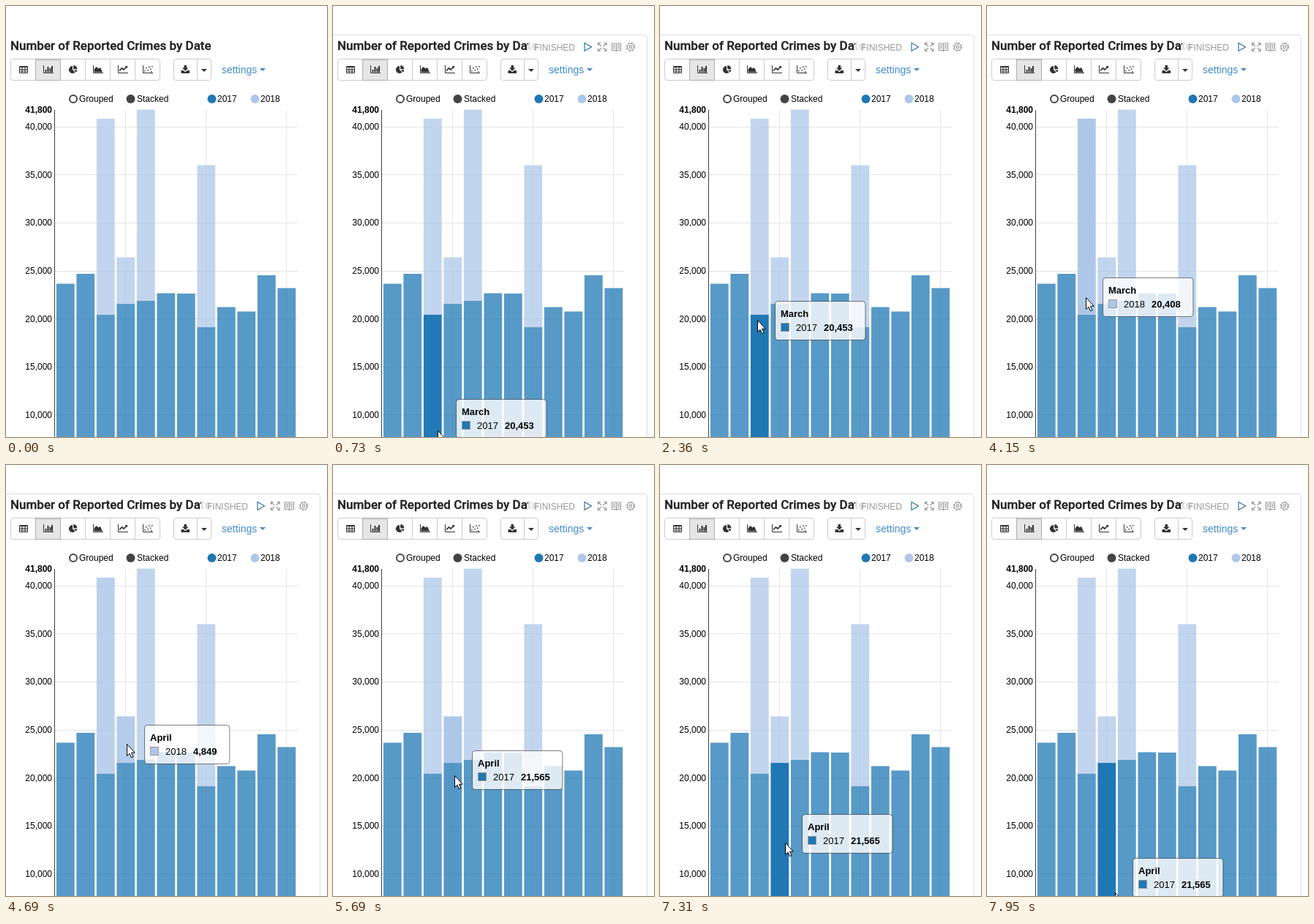
An HTML page for the animation above (8000 ms loop, 439x589 px).

```html
<!DOCTYPE html>
<html lang="en">
<head>
<meta charset="utf-8">
<title>Reported crimes chart</title>
<style>
  html, body { margin: 0; width: 100%; height: 100%; overflow: hidden; background: #fff; }
  svg { display: block; font: 12px "Liberation Sans", Arial, sans-serif; }
  .title { font: 500 17px Roboto, sans-serif; fill: #212121; stroke: #212121; stroke-width: .35; }
  .grid { stroke: #e5e5e5; }
  .icon { fill: #333; }
  .line { fill: none; stroke: #333; }
  .link { fill: #428bca; }
  .tool { fill: none; stroke: #999; stroke-width: 1.2; }
  .tip { font-size: 13px; }
  .bold { font-weight: bold; }
</style>
</head>
<body>
<svg id="stage" width="439" height="589" viewBox="0 0 439 589">
  <text class="title" x="6" y="60">Number of Reported Crimes by Date</text>

  <g id="panel">
    <path d="M0 39.5H426Q429.5 39.5 429.5 43V589" fill="none" stroke="#ddd"/>
    <rect x="267" y="46" width="150" height="20" fill="#fff" opacity=".85"/>
    <text x="275" y="61" fill="#999">FINISHED</text>
    <path class="tool" d="M344 50.5V61.5L353.500 56Z" style="stroke:#3071a9"/>
    <path class="tool" d="M362.500 54V50.500H366M370.500 50.500H374V54M374 58V61.500H370.500M366 61.500H362.500V58M363 51L367 55M373.500 51L369.500 55M363 61L367 57M373.500 61L369.500 57"/>
    <path class="tool" d="M381.500 51H386Q387.500 51 387.500 52.500Q387.500 51 389 51H393.500V60.500H389L387.500 61.500L386 60.500H381.500ZM387.500 52V61M383 53.500H386M383 55.500H386M383 57.500H386M389 53.500H392M389 55.500H392M389 57.500H392"/>
    <circle class="tool" cx="407" cy="56" r="4.500"/>
    <circle class="tool" cx="407" cy="56" r="1.800"/>
    <circle class="tool" cx="407" cy="56" r="5.600" stroke-dasharray="2.200 2.200"/>
  </g>

  <g id="toolbar">
    <rect x="6.500" y="72.500" width="204" height="29" rx="3.500" fill="#fff" stroke="#ccc"/>
    <path d="M74.500 73V101M108.500 73V101M142.500 73V101M176.500 73V101" stroke="#ccc"/>
    <rect x="40.500" y="72.500" width="34" height="29" fill="#e6e6e6" stroke="#adadad"/>
    <path d="M41 74H74" stroke="#000" stroke-width="2" opacity=".08"/>
    <path class="line" d="M18.500 82.500H29.500V91.500H18.500ZM18.500 83.500H29.500M18.500 86.500H29.500M18.500 89H29.500M22 83V91.500M26 83V91.500"/>
    <path class="line" d="M51.500 81V91.500H65"/>
    <path class="icon" d="M53.500 87h2v3.500h-2zM56.500 83h2v7.500h-2zM59.500 85h2v5.500h-2zM62 82h2v8.500h-2z"/>
    <path class="icon" d="M91 82A5 5 0 1 0 94.500 90.500L91 87ZM92.200 81V86.200H97.400A5.200 5.200 0 0 0 92.200 81ZM92.700 87.400H97.400A5 5 0 0 1 95.900 90.600Z"/>
    <path class="line" d="M119.500 81V91.500H133"/>
    <path class="icon" d="M120.500 90.500V86.500L123.500 83L126.500 85.500L129 84L132 90.500Z"/>
    <path class="line" d="M153.500 81V91.500H167"/>
    <path class="line" d="M155 88.500L158.500 85L161 87L165 83" stroke-width="1.700"/>
    <path class="icon" d="M162.500 82H166V85.500Z"/>
    <path class="line" d="M187.500 81V91.500H201"/>
    <path class="icon" d="M189 88h1.500v1.500H189zM191 84h1.500v1.500H191zM193.500 87h1.500v1.500h-1.500zM195 82.500h1.500V84H195zM197 85.500h1.500V87H197zM198 89h1.500v1.500H198zM199 82h1.500v1.500H199z"/>
    <rect x="229.500" y="72.500" width="51" height="29" rx="3.500" fill="#fff" stroke="#ccc"/>
    <path d="M261.500 73V101" stroke="#ccc"/>
    <path class="icon" d="M243.500 81H247V84.500H249.500L245.250 88.700L241 84.500H243.500ZM239.500 88H242.700L245.250 90.300L247.800 88H251V92H239.500Z"/>
    <path class="icon" d="M267 86H275L271 90Z"/>
    <text class="link" x="295" y="92" font-size="14">settings</text>
    <path class="link" d="M347 85H355L351 89Z"/>
  </g>

  <g id="legend">
    <circle cx="92" cy="127" r="5" fill="#fff" stroke="#444" stroke-width="2"/>
    <text x="100" y="131">Grouped</text>
    <circle cx="170.500" cy="127" r="6" fill="#444"/>
    <text x="179" y="131">Stacked</text>
    <circle cx="281.500" cy="127" r="6" fill="#1f77b4"/>
    <text x="289" y="131">2017</text>
    <circle cx="340.500" cy="127" r="6" fill="#aec7e8"/>
    <text x="348" y="131">2018</text>
  </g>

  <g id="chart"></g>

  <g id="tip" class="tip">
    <rect id="box" x=".5" y=".5" height="53" rx="4" fill="#fff" fill-opacity=".8" stroke="#000" stroke-opacity=".5"/>
    <text id="month" class="bold" x="8" y="22"></text>
    <rect id="swatch" x="8.500" y="30.500" width="11" height="11" stroke="#999"/>
    <text id="year" x="29" y="41"></text>
    <text id="count" class="bold" x="67" y="41"></text>
  </g>
  <path id="cursor" d="M.500 .500V16.500L4 13.200L6.500 18.800L9 17.700L6.500 12.200H11.300Z" fill="#fff" stroke="#000"/>
</svg>
<script>
const LOOP = 8000;
const FADE = 250;
const TIP_MAX_Y = 537;
const COLORS = ['#1f77b4', '#aec7e8'];
const MONTHS = { 2: 'March', 3: 'April' };
const COUNTS = [
  [23666, 24695, 20453, 21565, 21880, 22675, 22640, 19130, 21230, 20770, 24545, 23210],
  { 2: 20408, 3: 4849, 4: 19920, 7: 16884 },
];

const MOVES = [
  [500, 960, 7, [[0, 146, 622], [1, 141, 559]]],
  [1510, 1810, 5, [[0, 141, 559], [.25, 141, 559], [1, 138, 509]]],
  [2130, 2670, 8, [[0, 138, 509], [3 / 7, 133, 429], [4 / 7, 133, 429], [1, 134, 397]]],
  [4150, 4690, 8, [[0, 134, 397], [1 / 7, 134.5, 398], [1, 165, 381]]],
  [5530, 5990, 7, [[0, 165, 381], [1 / 3, 166, 416], [.5, 166, 424], [1, 168, 454]]],
  [6940, 7710, 11, [[0, 168, 454], [.1, 168, 464], [1, 175, 581]]],
  [7780, 7950, 3, [[0, 175, 581], [1, 175, 584]]],
];

const $ = id => document.getElementById(id);
const yOf = count => 690 - count * 0.01312;
const columnX = i => 68.9 + 27.5 * i;

function add(name, attrs, text = '') {
  const node = document.createElementNS('http://www.w3.org/2000/svg', name);
  for (const key in attrs) node.setAttribute(key, attrs[key]);
  node.textContent = text;
  return $('chart').appendChild(node);
}

function drawChart() {
  for (let count = 10000; count <= 40000; count += 5000) {
    const y = yOf(count);
    const lineY = Math.floor(y) + .5;
    add('path', { class: 'grid', d: `M67 ${lineY}H399` });
    add('text', { x: 63, y: y + 4, 'text-anchor': 'end' }, count.toLocaleString('en-US'));
  }
  for (const x of [163.5, 273.5, 383.5]) add('path', { class: 'grid', d: `M${x} 142V589` });
  add('text', { x: 63, y: 146, 'text-anchor': 'end', class: 'bold' }, '41,800');
  add('path', { d: 'M66.5 142V589', stroke: '#000', 'stroke-opacity': .75 });

  const bars = {};
  COUNTS[0].forEach((base, column) => {
    const bar = (series, from, to) => {
      bars[`${column},${series}`] = add('rect', {
        x: columnX(column), width: 24.8, y: yOf(to), height: yOf(from) - yOf(to),
        fill: COLORS[series], 'fill-opacity': .75,
      });
    };
    bar(0, 0, base);
    const extra = COUNTS[1][column];
    if (extra) bar(1, base, base + extra);
  });
  return bars;
}

function along(points, p) {
  const i = Math.max(1, points.findIndex(point => point[0] >= p));
  const [p0, x0, y0] = points[i - 1];
  const [p1, x1, y1] = points[i];
  const f = (p - p0) / (p1 - p0);
  return [x0 + (x1 - x0) * f, y0 + (y1 - y0) * f];
}

function cellAt([x, y]) {
  const column = Math.floor((x - 67.5) / 27.5);
  return `${column},${y < yOf(COUNTS[0][column]) ? 1 : 0}`;
}

// The tooltip trails the pointer by one step.
function buildSteps() {
  return MOVES.flatMap(([start, end, count, points]) =>
    Array.from({ length: count }, (_, k) => {
      const last = count - 1;
      const tip = along(points, k / last);
      return {
        time: Math.floor((start + (end - start) * k / last) / 10) * 10,
        pointer: along(points, Math.min(1, (k + 1) / last)),
        tip,
        cell: cellAt(tip),
      };
    }));
}

const bars = drawChart();
const steps = buildSteps();
const hovers = steps.filter((step, i) => !i || step.cell !== steps[i - 1].cell);

function moveTo(id, x, y) {
  $(id).setAttribute('transform', `translate(${Math.round(x)} ${Math.round(y)})`);
}

function showTip({ tip: [x, y], cell }) {
  const [column, series] = cell.split(',');
  const count = COUNTS[series][column].toLocaleString('en-US');
  moveTo('tip', x + 24, Math.min(y - 26, TIP_MAX_Y));
  $('box').setAttribute('width', 80.8 + 7.1 * count.length);
  $('month').textContent = MONTHS[column];
  $('year').textContent = 2017 + Number(series);
  $('count').textContent = count;
  $('swatch').setAttribute('fill', COLORS[series]);
}

function highlight(t) {
  for (const cell in bars) {
    let level = 0;
    hovers.forEach((hover, i) => {
      if (hover.time > t) return;
      const f = Math.min(1, (t - hover.time) / FADE);
      if (hover.cell === cell) level += (1 - level) * f;
      else if (i && hovers[i - 1].cell === cell) level *= 1 - f;
    });
    bars[cell].setAttribute('fill-opacity', .75 + .25 * level);
  }
}

function render(t) {
  const step = steps.filter(s => s.time <= t).pop();
  for (const id of ['panel', 'tip', 'cursor']) $(id).style.display = step ? '' : 'none';
  highlight(t);
  if (!step) return;
  moveTo('cursor', ...step.pointer);
  showTip(step);
}

let origin;
function tick(now) {
  origin ??= now;
  render((now - origin) % LOOP);
  requestAnimationFrame(tick);
}
render(0);
requestAnimationFrame(tick);
</script>
</body>
</html>
```
